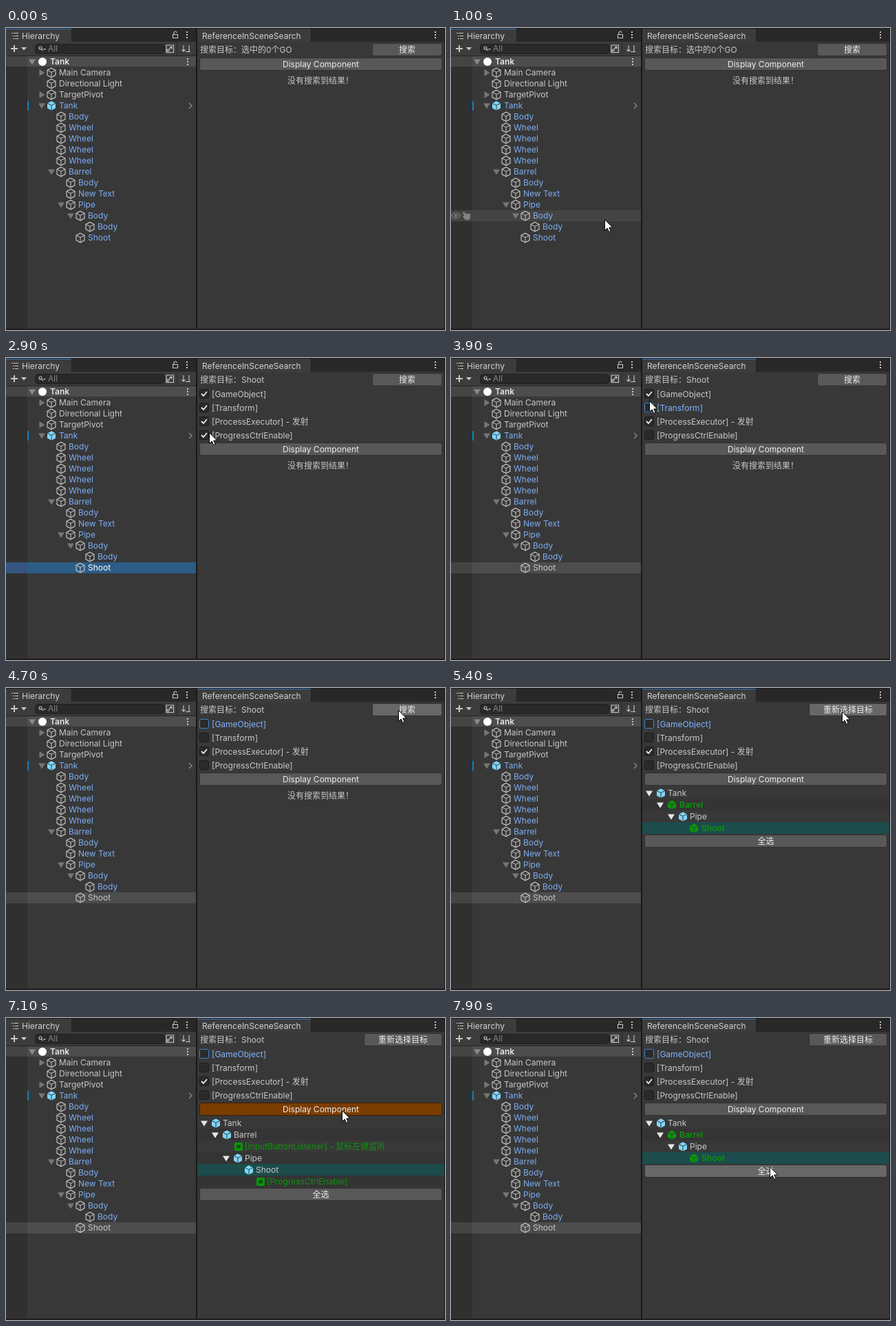
An HTML page with a canvas for the animation above (8 s loop, 638 px wide and 439 px high).

```html
<!DOCTYPE html>
<html lang="zh-CN">
<head>
<meta charset="utf-8">
<style>
  html, body { margin: 0; height: 100%; overflow: hidden; background: #383838; }
  canvas { display: block; width: 638px; height: 439px; }
</style>
</head>
<body>
<canvas id="stage" width="638" height="439"></canvas>
<script>
const ctx = document.getElementById('stage').getContext('2d');
const LOOP = 8000, STEP = 100;
const FONT = '12px Inter, "Noto Sans CJK SC", "Noto Sans CJK", sans-serif';
const GREY = '#c8c8c8', BLUE = '#7dadf3', ACCENT = '#3a79bb', GREEN = '#0a960a', SKY = '#7fd6fc';
const COLON = '\uFF1A', BANG = '\uFF01'; // full-width punctuation

// Pointer keyframes: time, x, y
const POINTER = [
  [400, 574, 128], [1200, 158, 306], [1900, 158, 306], [2500, 301, 142], [2800, 295, 108],
  [3200, 295, 108], [3700, 288, 62], [3900, 288, 62], [4100, 289, 47], [4200, 289, 47],
  [4700, 570, 32], [4900, 568, 34], [5400, 568, 34], [5800, 488, 134], [7500, 488, 134], [7900, 463, 216]
];

// Scene tree: depth, name, style, foldout
const SCENE = [
  [1, 'Main Camera', 'plain', 'closed'], [1, 'Directional Light', 'plain'], [1, 'TargetPivot', 'plain', 'closed'],
  [1, 'Tank', 'prefab', 'open'], [2, 'Body'], [2, 'Wheel'], [2, 'Wheel'], [2, 'Wheel'], [2, 'Wheel'],
  [2, 'Barrel', '', 'open'], [3, 'Body'], [3, 'New Text'], [3, 'Pipe', '', 'open'],
  [4, 'Body', '', 'open'], [5, 'Body'], [4, 'Shoot']
];

// Checkbox rows: label, click time, release time, time focus moves on
const OPTIONS = [
  ['[GameObject]', 4300, 4400, LOOP], ['[Transform]', 3800, 3800, 4300],
  ['[ProcessExecutor] - 发射', LOOP, LOOP, LOOP], ['[ProgressCtrlEnable]', 3000, 3100, 3800]
];

// Search results: depth, name, kind
const RESULTS = [[0, 'Tank'], [1, 'Barrel', 'hit'], [2, 'Pipe'], [3, 'Shoot', 'hit']];
const DETAILED = [
  [0, 'Tank'], [1, 'Barrel'], [2, '[InputButtonListener] - 鼠标左键监听', 'script'],
  [2, 'Pipe'], [3, 'Shoot'], [4, '[ProgressCtrlEnable]', 'script']
];

function rect(x, y, w, h, color) {
  ctx.fillStyle = color;
  ctx.fillRect(x, y, w, h);
}

function box(x, y, w, h, fill, border, radius = 3) {
  ctx.beginPath();
  ctx.roundRect(x + .5, y + .5, w - 1, h - 1, radius);
  ctx.fillStyle = fill;
  ctx.fill();
  ctx.strokeStyle = border;
  ctx.lineWidth = 1;
  ctx.stroke();
}

function text(s, x, centerY, color = GREY, weight = '', align = 'left') {
  ctx.font = weight + ' ' + FONT;
  ctx.textAlign = align;
  ctx.fillStyle = color;
  ctx.fillText(s, x, centerY + 4);
}

function icon(path, x, y, color, width = 1.1, filled = false) {
  ctx.save();
  ctx.translate(x, y);
  ctx.lineWidth = width;
  ctx.fillStyle = ctx.strokeStyle = color;
  const shape = new Path2D(path);
  if (filled) ctx.fill(shape); else ctx.stroke(shape);
  ctx.restore();
}

const HEXAGON = 'M0-6.8L6-3.6V3.6L0 6.8L-6 3.6V-3.6Z';
const EDGES = 'M-6-3.6L0-.6L6-3.6M0-.6V6.8';

function cube(x, y, color, solid, gap = '#383838') {
  icon(HEXAGON, x, y, color, 1.1, solid);
  icon(EDGES, x, y, solid ? gap : color, 1);
}

function foldout(x, y, state, color) {
  const path = state === 'open' ? 'M-5-3.5H5L0 4.5Z' : 'M-3.5-5V5L4.5 0Z';
  icon(path, x, y, color, 1, true);
}

function kebab(x, y) {
  for (const dy of [-4, 0, 4]) rect(x - 1, y + dy - 1, 2, 2, GREY);
}

function pointerAt(t) {
  if (t < POINTER[0][0]) return null;
  const next = POINTER.findIndex(k => k[0] > t);
  if (next < 0) return POINTER.at(-1).slice(1);
  const [t0, x0, y0] = POINTER[next - 1], [t1, x1, y1] = POINTER[next];
  const p = (t - t0) / (t1 - t0), e = p * p * (3 - 2 * p);
  return [Math.round(x0 + (x1 - x0) * e), Math.round(y0 + (y1 - y0) * e)];
}

function inside(p, x, y, w, h) {
  return p && p[0] >= x && p[0] < x + w && p[1] >= y && p[1] < y + h;
}

function button(label, x, y, pointer, active) {
  const w = 634 - x, hover = inside(pointer, x, y, w, 19);
  box(x, y, w, 19, active ? '#7a3d00' : hover ? '#676767' : '#585858', active ? '#3a1d00' : '#303030');
  text(label, x + w / 2, y + 9.5, '#eeeeee', '', 'center');
}

function tab(x, w, label, labelX, focused) {
  rect(x, 1, w, 20, '#3c3c3c');
  if (focused) rect(x, 1, w, 1, ACCENT);
  rect(x + w, 1, 1, 19, '#232323');
  text(label, labelX, 12, '#d2d2d2');
}

function drawHierarchy(t, pointer) {
  const focused = t < 3000;
  rect(0, 0, 276, 439, '#383838');
  rect(0, 0, 276, 20, '#282828');
  tab(0, 95, 'Hierarchy', 23, focused);
  icon('M0 0H2M3 0H10M2 4H4M5 4H10M2 8H4M5 8H10', 8, 7.5, GREY);
  icon('M-3.5 0H3.5V5H-3.5ZM-2 0V-2.5A2 2 0 0 1 2-2.5', 246, 9.5, GREY);
  kebab(263, 10);

  rect(0, 20, 276, 20, '#3c3c3c');
  rect(0, 40, 276, 1, '#232323');
  icon('M-5 0H5M0-5V5', 12, 30, GREY, 2);
  icon('M-4-2H4L0 2.5Z', 26, 30, GREY, 1, true);
  box(42, 23, 188, 15, '#292929', '#202020', 4);
  icon('M2 0A2 2 0 1 1-2 0A2 2 0 1 1 2 0M1.4 1.4L4 4', 50, 29, GREY);
  icon('M4 1H8L6 3Z', 50, 29, GREY, 1, true);
  text('All', 61, 30, '#858585');
  rect(230, 21, 1, 19, '#2b2b2b');
  icon('M-5-5H5.5V5.5H-5Z M-1 2.5A1.5 1.5 0 1 1-1 2.4M-1 1L3-3M0-2.5H3V.5', 238, 30, GREY);
  rect(248, 21, 1, 19, '#2b2b2b');
  icon('M-3-5V4M-5.5 1.5L-3 4L-.5 1.5M0 4.5H7M5 4V-5', 261, 30, GREY);

  rect(0, 41, 276, 394, '#383838');
  rect(0, 41, 31, 396, '#303030');
  rect(0, 41, 276, 15, '#4d4d4d');
  rect(0, 41, 31, 15, '#444444');
  foldout(38, 49, 'open', '#8a8a8a');
  icon('M6 0A6 6 0 1 1-6 0A6 6 0 1 1 6 0', 53, 49, '#ffffff', 1, true);
  text('Tank', 64, 49, '#e6e6e6', '600');
  kebab(264, 49);

  SCENE.forEach(([depth, name, style, fold], i) => {
    const y = 65 + i * 16, x = 52 + depth * 14;
    const selected = name === 'Shoot' && t >= 1300;
    const hover = inside(pointer, 0, y - 8, 276, 16);
    if (selected) {
      rect(0, y - 8, 276, 16, focused ? '#2c5d87' : '#4d4d4d');
      rect(0, y - 8, 31, 16, focused ? '#35557f' : '#444444');
    } else if (hover) {
      rect(0, y - 8, 276, 16, '#444444');
    }
    if (hover) drawVisibility(y, selected ? '#5f7da3' : '#828282');
    if (fold) foldout(x - 14, y, fold, '#767676');
    cube(x, y, style === 'prefab' ? SKY : GREY, style === 'prefab');
    const color = selected ? (focused ? '#ffffff' : GREY) : style === 'plain' ? GREY : BLUE;
    text(name, x + 11, y, color);
    if (style === 'prefab') {
      rect(31, y - 7, 2, 14, '#0f81be');
      icon('M-2-4L2 0L-2 4', 268, y, '#8a8a8a', 1.3);
    }
  });
}

function drawVisibility(y, color) {
  icon('M-6.5 0Q0-8 6.5 0Q0 8-6.5 0Z', 7, y, color);
  icon('M2 0A2 2 0 1 1-2 0A2 2 0 1 1 2 0', 7, y, color, 1, true);
  icon('M-6-5L-4-6L-1-2V-3H5V3L3 6H-2L-6 1L-4 0Z', 23, y, color, 1, true);
}

function drawOption([label, clicked, released, blurred], t, y) {
  const focus = clicked <= t && t < blurred;
  box(281, y - 8, 14, 14, '#2a2a2a', focus ? '#3f84d0' : '#1c1c1c', 2);
  if (t < released) icon('M-4 0L-1 3L4-3', 288, y - 1, '#eeeeee', 1.8);
  text(label, 299, y, focus ? '#81b4ff' : GREY);
}

function drawResults(rows, pointer) {
  rows.forEach(([depth, name, kind], i) => {
    const y = 153 + i * 17, x = 305 + depth * 16;
    if (name === 'Shoot') rect(278, y - 9, 359, 17, '#1c4c4b');
    else if (i % 2) rect(278, y - 9, 359, 17, '#343434');
    if (kind === 'script') {
      box(x - 5, y - 6, 12, 12, GREEN, GREEN, 1);
      icon('M-1-3L-2 3M2-3L1 3M-3-1H3M-3 1H3', x + 1, y, '#1b2d1b', 1);
      text(name, x + 10, y, GREEN);
    } else {
      if (depth < 3) foldout(x - 17, y, 'open', '#e6e6e6');
      cube(x, y, kind ? GREEN : SKY, true, name === 'Shoot' ? '#1c4c4b' : '#303030');
      text(name, x + (kind ? 11 : 10), y, kind ? GREEN : GREY, kind ? '600' : '');
    }
  });
  button('全选', 281, 145 + rows.length * 17, pointer);
}

function drawSearch(t, pointer) {
  const picked = t >= 1400, found = t >= 5000, detailed = t >= 6100 && t < 7200;
  rect(278, 0, 359, 439, '#383838');
  rect(278, 0, 359, 20, '#282828');
  tab(278, 165, 'ReferenceInSceneSearch', 285, t >= 3000);
  kebab(624, 10);
  text('搜索目标' + COLON + (picked ? 'Shoot' : '选中的0个GO'), 282, 32);
  button(found ? '重新选择目标' : '搜索', found ? 520 : 532, 22, pointer);
  if (picked) OPTIONS.forEach((option, i) => drawOption(option, t, 53 + i * 20));
  const y = picked ? 123 : 43;
  button('Display Component', 281, y, pointer, detailed);
  if (found) drawResults(detailed ? DETAILED : RESULTS, pointer);
  else text('没有搜索到结果' + BANG, 457, y + 34, GREY, '', 'center');
}

function drawPointer([x, y]) {
  const arrow = 'M.5.5V16.5L4.2 13L6.7 18.5L9.2 17.4L6.8 12H11.8Z';
  icon(arrow, x, y, '#ffffff', 1, true);
  icon(arrow, x, y, '#000000', 1);
}

function draw(now) {
  const t = Math.floor((now % LOOP) / STEP) * STEP;
  const pointer = pointerAt(t);
  drawHierarchy(t, pointer);
  drawSearch(t, pointer);
  rect(276, 0, 2, 439, '#191919');
  rect(637, 0, 1, 439, '#191919');
  rect(0, 0, 638, 1, '#191919');
  rect(0, 437, 638, 2, '#211a1b');
  if (pointer) drawPointer(pointer);
}

const start = performance.now();
function tick() {
  draw(performance.now() - start);
  requestAnimationFrame(tick);
}
tick();
</script>
</body>
</html>
```
